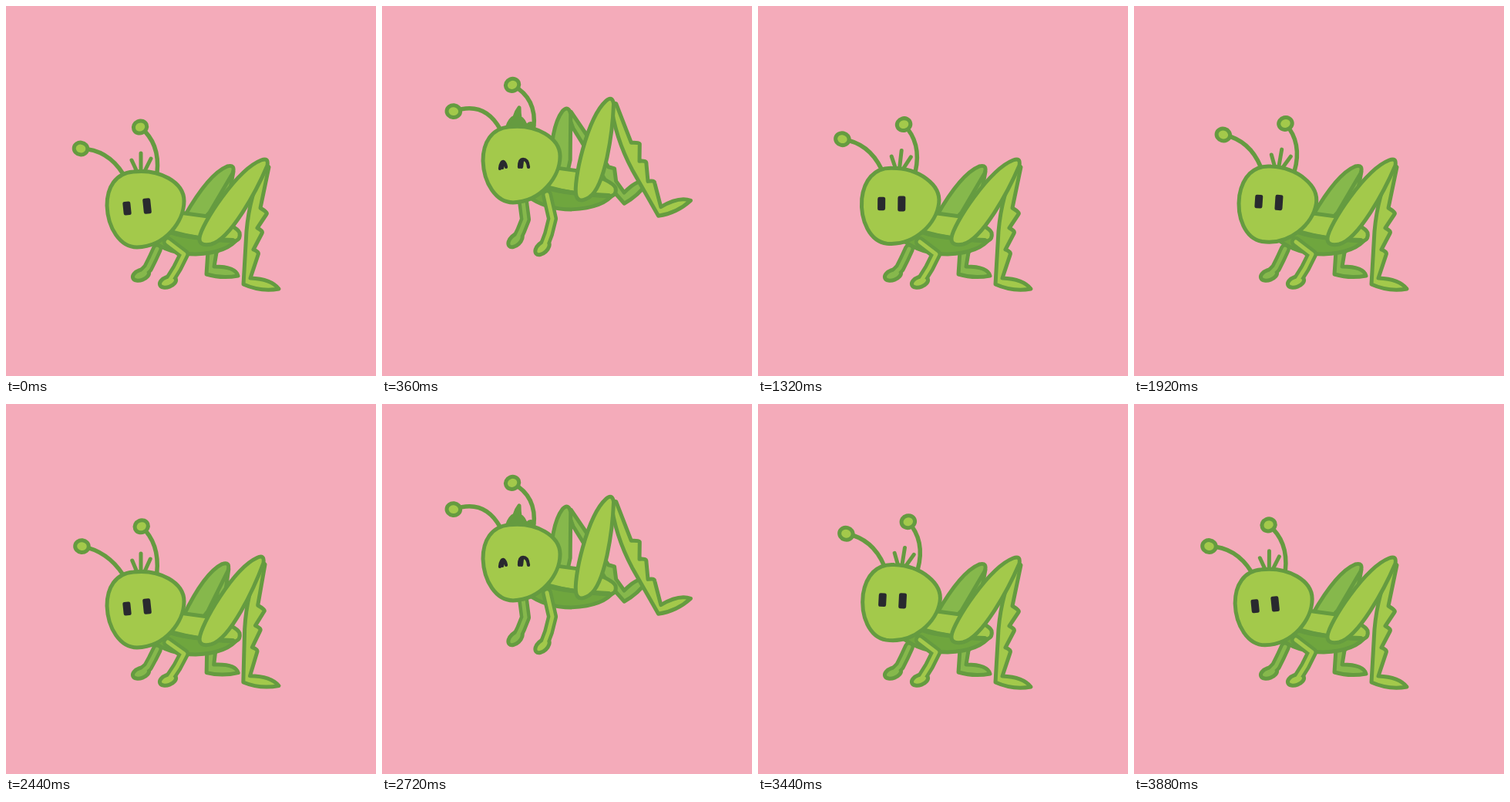
An HTML page with a canvas that plays this animation: 480 px wide and 480 px high, repeating every 3.92 s.

```html
<!DOCTYPE html>
<html>
<head>
<meta charset="utf-8">
<style>
html, body { margin: 0; width: 100%; height: 100%; overflow: hidden; background: #f4abba; }
canvas { display: block; width: 480px; height: 480px; }
</style>
</head>
<body>
<canvas id="stage" width="480" height="480"></canvas>
<script>
const ctx = document.getElementById('stage').getContext('2d');
const LINE = '#659b40', LIGHT = '#a3c94b', MID = '#86b84c', DARK = '#6fa63e', INK = '#29292f';
const LOOP = 3920, HOP = 2360, STEP = 40;

const shapes = {
  head: 'M165 215C200 211 231 229 231 253C231 279 207 312 170 313C148 313 132 288 131 259C131 235 142 217 165 215Z',
  belly: 'M188 304Q212 322 246 322Q288 320 301 301L225 278Z',
  wing: 'M225 268L262 273Q299 285 303 294Q305 305 294 305Q250 303 215 293Z',
  band: 'M215 294Q240 302 294 304',
  nearThigh: 'M251 301C253 283 300 212 331 200Q341 196 339 207C325 240 291 303 266 309Q250 312 251 301Z',
  nearShin: 'M336 204L341 209L330 262Q340 268 338 270L326 288Q334 292 332 295L321 316Q329 319 327 323L317 353Q344 354 354 367Q330 371 308 361L312 292Q316 245 336 204Z',
  farThigh: 'M232 272C244 251 265 217 287 208Q298 205 294 217L264 268L235 300Z',
  farShin: 'M291 212L295 215L279 300L283 307L273 320L270 338Q298 338 301 350Q280 354 260 348L262 318L282 232Z',
  tuft: 'M163 214Q166 205 172 202Q174 195 178 190Q178 198 179 203Q185 207 186 214ZM189 213Q193 208 197 213Z',
  smile: 'M153 269Q154 260 157 260Q160 261 161 267M157 261L156 268M178 267Q178 257 183 257Q189 257 190 267M182 258L181 267'
};
for (const key in shapes) shapes[key] = new Path2D(shapes[key]);

const nearArm = [[210, 306], [231, 322], [222, 340], [212, 356]];
const nearArmAir = [[214, 303], [221, 334], [216, 354], [210, 370]];
const farArm = [[196, 315], [190, 328], [184, 340], [177, 347]];
const farArmAir = [[183, 312], [186, 335], [180, 350], [175, 360]];

const mix = (a, b, k) => a + (b - a) * k;
const clamp = x => Math.max(0, Math.min(1, x));

// Smooth interpolation through [time, value] pairs
function track(t, keys) {
  const i = keys.findIndex(k => k[0] > t);
  if (i < 0) return keys[keys.length - 1][1];
  const [t0, v0] = keys[i - 1], [t1, v1] = keys[i];
  const k = (t - t0) / (t1 - t0);
  return mix(v0, v1, k * k * (3 - 2 * k));
}

function stroke(path, width = 5, color = LINE) {
  ctx.lineWidth = width;
  ctx.strokeStyle = color;
  ctx.stroke(path);
}

function paint(path, fill) {
  ctx.fillStyle = fill;
  ctx.fill(path);
  stroke(path);
}

function turn(x, y, degrees) {
  ctx.translate(x, y);
  ctx.rotate(degrees * Math.PI / 180);
  ctx.translate(-x, -y);
}

function group(draw) {
  ctx.save();
  draw();
  ctx.restore();
}

function oval(x, y, rx, ry, tilt) {
  const p = new Path2D();
  p.ellipse(x, y, rx, ry, tilt, 0, 7);
  return p;
}

function arm(ground, air, lift, dy, color) {
  const pts = ground.map(([x, y], i) => [
    mix(x, air[i][0], lift),
    mix(y, air[i][1], lift) + (dy > 0 ? dy * (1 - i / 3) : dy)
  ]);
  const [a, b, c, d] = pts;
  const leg = new Path2D(`M${a}L${b}L${c}L${d}`);
  const foot = oval(d[0] - 2, d[1] + 2, 11, 6.5, -0.35 - 0.4 * lift);
  stroke(leg, 14);
  paint(foot, color);
  stroke(leg, 5, color);
}

function hindLeg(hip, knee, thighTurn, shinTurn, thigh, shin, color) {
  group(() => {
    turn(...hip, thighTurn);
    group(() => {
      turn(...knee, shinTurn - thighTurn);
      paint(shin, color);
    });
    paint(thigh, color);
  });
}

function antenna(base, bend, tip, tilt) {
  stroke(new Path2D(`M${base}Q${bend} ${tip}`), 5.5);
  paint(oval(...tip, 8.8, 7.9, tilt), LIGHT);
}

function head(sway, lag, rising, happy) {
  ctx.translate(4.5 * sway, -5 * sway);
  turn(181, 263, 10 * sway);
  const at = (x, y, dx, dy) => [x + dx * lag, y + dy * lag];
  antenna(at(152, 218, -2, 0), at(132, 186, -1, 8), at(97, 185, 6, -14), 0.1);
  antenna(at(196, 216, -1, 0), at(200, 178, -2, 0), at(174, 157, 7, -5), -0.4);
  if (rising) {
    paint(shapes.tuft, LINE);
  } else {
    const s = 1 - 0.25 * Math.max(0, lag);
    stroke(new Path2D(`M175 191V214M${175 - 12 * s} 200L170 215M${175 + 13 * s} 198L180 214`), 5);
  }
  paint(shapes.head, LIGHT);
  if (happy) return stroke(shapes.smile, 4.3, INK);
  ctx.fillStyle = INK;
  for (const [x, y, h] of [[157, 262.5, 17.5], [183, 259.5, 20]]) {
    group(() => {
      turn(x, y, -6);
      ctx.beginPath();
      ctx.roundRect(x - 5, y - h / 2, 10, h, 2.5);
      ctx.fill();
    });
  }
}

function draw(time) {
  const now = Math.floor(time % LOOP / STEP) * STEP;
  const t = now % HOP;
  const height = Math.max(0, 1 - ((t - 478) / 191) ** 2);
  const squat = track(t, [[0, 0], [160, 1], [287, 0], [669, 0], [720, 1], [900, 0]]);
  const lag = track(t, [[0, 0], [140, 0.4], [360, -0.7], [480, -0.4], [580, 0.6], [720, 1], [920, 0]]);
  const sway = t > 760 ? Math.sin(Math.PI * (t - 760) / 800) ** 2 : 0;
  const dy = 6 * squat - 94 * height;
  const swing = height / 0.62, lift = clamp(swing);

  ctx.fillStyle = '#f4abba';
  ctx.fillRect(0, 0, 480, 480);
  ctx.lineCap = ctx.lineJoin = 'round';

  group(() => {
    ctx.translate(0, dy);
    hindLeg([235, 300], [293, 211], -30 * lift - 8 * squat, -45 * swing - 5.4 * squat,
      shapes.farThigh, shapes.farShin, MID);
  });
  arm(farArm, farArmAir, lift, dy, MID);
  group(() => {
    ctx.translate(0, dy);
    paint(shapes.belly, DARK);
    paint(shapes.wing, LIGHT);
    stroke(shapes.band, 6);
  });
  arm(nearArm, nearArmAir, lift, dy, LIGHT);
  group(() => {
    ctx.translate(0, dy);
    hindLeg([260, 300], [337, 204], -21 * lift - 6 * squat, -33 * swing - 3.6 * squat,
      shapes.nearThigh, shapes.nearShin, LIGHT);
    head(sway, lag, t > 287 && t < 520, t >= 240 && t < 880);
  });
}

function tick() {
  draw(performance.now());
  requestAnimationFrame(tick);
}
tick();
</script>
</body>
</html>
```
